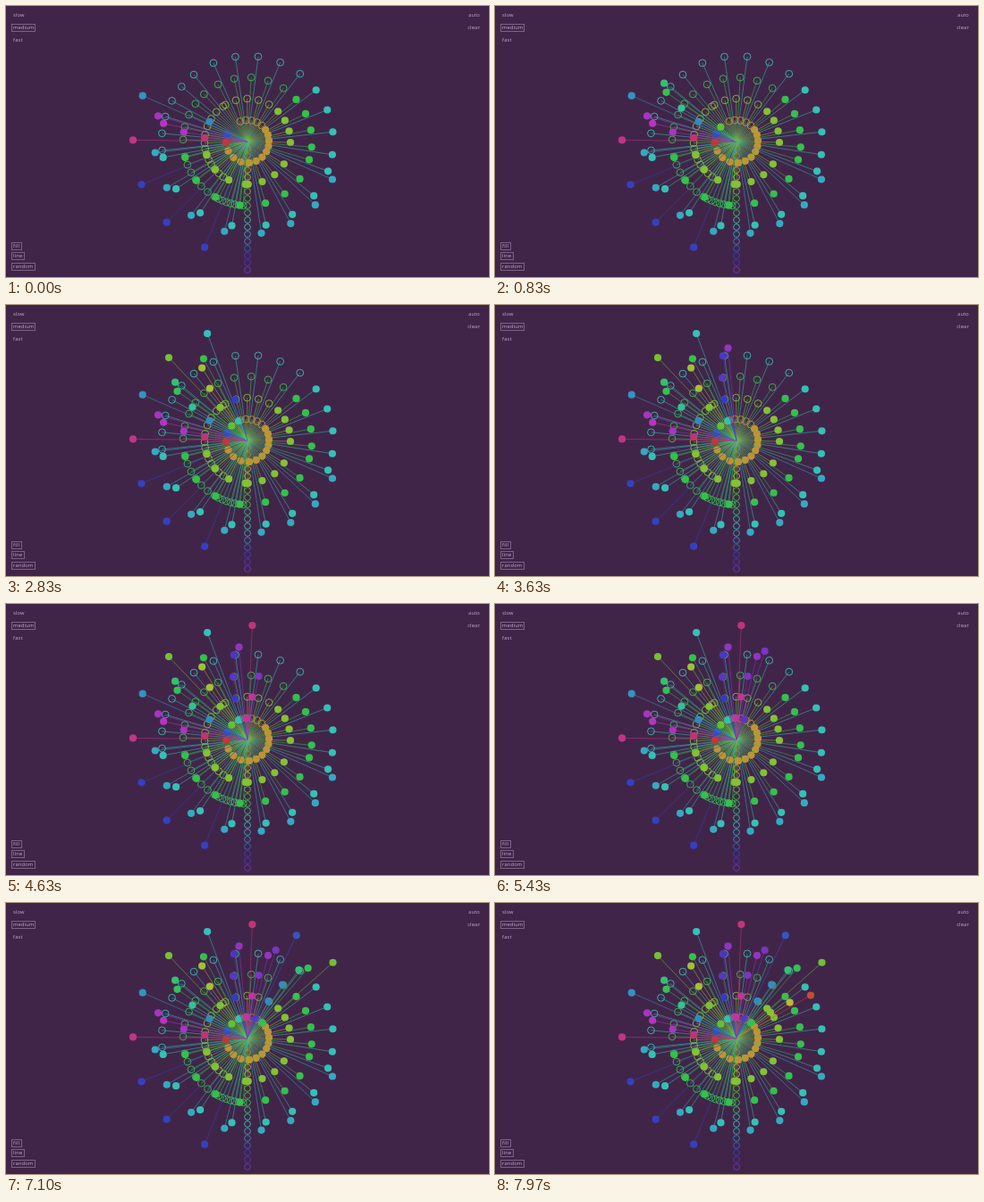
Recreate the animation shown at these times as an HTML page with a canvas. Size 540x304 px, loop 8000 ms.

```html
<!DOCTYPE html>
<html lang="en">
<head>
<meta charset="utf-8">
<title>Radial sequencer</title>
<style>
  html, body { margin: 0; width: 100%; height: 100%; overflow: hidden; background: #412549; }
  canvas { display: block; width: 540px; height: 304px; }
</style>
</head>
<body>
<canvas id="stage" width="540" height="304"></canvas>
<script>
const ctx = document.getElementById('stage').getContext('2d');
const LOOP = 8000, BEAT = 250, FIRST = 30;
const CX = 270, CY = 152, GAP = 8;
const START = 125;        // beats already played when the loop begins
const TURN = 1 / 15;      // radians per beat
const FILL_FROM = 59, RANDOM_FROM = 117;

// Rings in playing order, each with the beat at which it joins.
const rings = [
  { slot: 9, since: 0 },
  { slot: 12, since: 22 },
  { slot: 13, since: 75 },
  { slot: 3, since: 39 },
  { slot: 16, since: 95 },
  { slot: 6, since: 8 }
];

// Random mode drifts between these hues, five beats apart, with seeded jitter.
const drift = [345, 270, 145, 60, 225, 320, 240, 150, 10];

const tint = (hue, alpha = 1) => `hsla(${hue}, 57%, 48%, ${alpha})`;
const slotHue = slot => 15 * slot - 5;

function noise(seed) {
  const v = Math.sin(seed * 12.9898) * 43758.5453;
  return v - Math.floor(v);
}

function randomHue(beat) {
  const p = (beat - RANDOM_FROM) / 5;
  const i = Math.min(Math.floor(p), drift.length - 2);
  const base = drift[i] + (drift[i + 1] - drift[i]) * (p - i);
  return base + 40 * (noise(beat) - 0.5);
}

function slotAt(beat) {
  const active = rings.filter(ring => ring.since <= beat);
  return active[beat % active.length].slot;
}

function circle(x, y, r, color, filled) {
  ctx.beginPath();
  ctx.arc(x, y, r, 0, 2 * Math.PI);
  if (filled) {
    ctx.fillStyle = color;
    ctx.fill();
  } else {
    ctx.strokeStyle = color;
    ctx.lineWidth = 0.9;
    ctx.stroke();
  }
}

function stamp(beat) {
  const slot = slotAt(beat);
  const angle = Math.PI / 2 + beat * TURN;
  const x = CX + slot * GAP * Math.cos(angle);
  const y = CY + slot * GAP * Math.sin(angle);
  const hue = beat < RANDOM_FROM ? slotHue(slot) : randomHue(beat);
  ctx.beginPath();
  ctx.moveTo(CX, CY);
  ctx.lineTo(x, y);
  ctx.strokeStyle = tint(hue, 0.75);
  ctx.lineWidth = 0.7;
  ctx.stroke();
  const filled = beat >= FILL_FROM;
  circle(x, y, filled ? 4.1 : 3.9, tint(hue), filled);
}

function column() {
  for (let slot = 1; slot <= 18; slot++) {
    circle(CX, CY + slot * GAP, 3.4, tint(slotHue(slot)), false);
  }
}

function label(text, x, y, boxWidth) {
  ctx.fillStyle = '#c3aec8';
  ctx.fillText(text, x, y);
  if (boxWidth) {
    ctx.strokeStyle = '#7a6482';
    ctx.lineWidth = 1;
    ctx.strokeRect(6.5, Math.floor(y - 4.5) + 0.5, boxWidth, 8);
  }
}

function menu() {
  ctx.font = '5.7px "Open Sans", sans-serif';
  ctx.letterSpacing = '0.2px';
  ctx.textBaseline = 'middle';
  ctx.textAlign = 'left';
  label('slow', 8, 11);
  label('medium', 8, 25, 26);
  label('fast', 8, 38.5);
  label('fill', 8, 269.5, 11);
  label('line', 8, 281, 14);
  label('random', 8, 292.5, 26);
  ctx.textAlign = 'right';
  label('auto', 530, 11);
  label('clear', 530, 25);
}

function draw() {
  const t = performance.now() % LOOP;
  const last = START + Math.floor((t - FIRST) / BEAT) + 1;
  ctx.fillStyle = '#412549';
  ctx.fillRect(0, 0, 540, 304);
  column();
  for (let beat = 1; beat <= last; beat++) stamp(beat);
  menu();
  requestAnimationFrame(draw);
}

draw();
</script>
</body>
</html>
```
